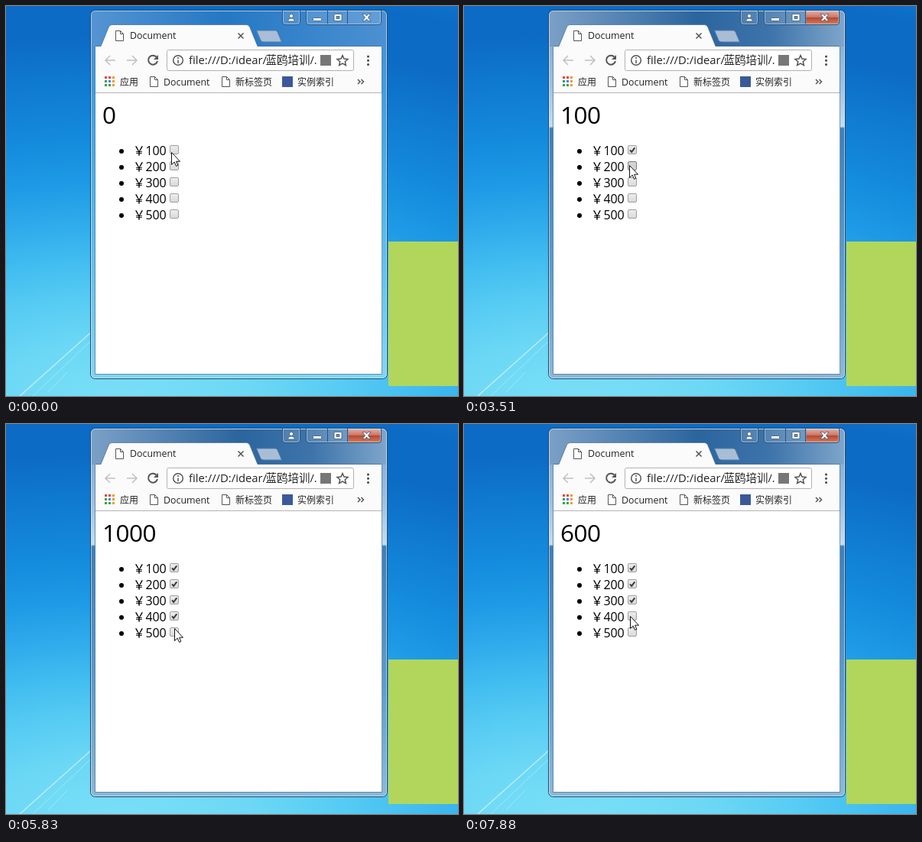
Recreate the animation shown at these times as an HTML page. Size 591x510 px, loop 8 s.

```html
<!DOCTYPE html>
<html lang="zh">
<head>
<meta charset="utf-8">
<title>Document</title>
<style>
html, body { margin: 0; width: 100%; height: 100%; overflow: hidden; background: #1b95e2; }
svg { display: block; width: 100vw; height: 100vh; }
text { font: 12.4px "Open Sans", "Noto Sans CJK SC", "Noto Sans CJK", sans-serif; fill: #222; }
.cjk { font-family: "Noto Sans CJK SC", "Noto Sans CJK", sans-serif; font-size: 12px; }
.page { font-size: 16px; fill: #000; letter-spacing: -.1px; }
.line { fill: none; stroke: #555; stroke-width: 1.5; }
#total { font-size: 31.5px; letter-spacing: -.5px; }
</style>
</head>
<body>
<svg viewBox="0 0 591 510">
  <defs>
    <radialGradient id="sky" gradientUnits="userSpaceOnUse" cx="0" cy="0" r="600" gradientTransform="translate(150 530) scale(2 1)">
      <stop offset="0" stop-color="#7de0f7"/>
      <stop offset=".15" stop-color="#6cd8f5"/>
      <stop offset=".25" stop-color="#56cbf3"/>
      <stop offset=".33" stop-color="#42bdf0"/>
      <stop offset=".42" stop-color="#2ea9eb"/>
      <stop offset=".5" stop-color="#1d9ae5"/>
      <stop offset=".6" stop-color="#148adc"/>
      <stop offset=".7" stop-color="#107cd2"/>
      <stop offset=".82" stop-color="#0c6bc5"/>
      <stop offset=".92" stop-color="#0c6bc5"/>
      <stop offset="1" stop-color="#127ad0"/>
    </radialGradient>
    <linearGradient id="idleSide" x2="0" y2="1">
      <stop offset="0" stop-color="#4a8ccc"/>
      <stop offset=".2" stop-color="#3f9be0"/>
      <stop offset=".5" stop-color="#4cb4ea"/>
      <stop offset="1" stop-color="#7fd6f3"/>
    </linearGradient>
    <linearGradient id="idleTop">
      <stop offset="0" stop-color="#5594d3"/>
      <stop offset=".45" stop-color="#2478c4"/>
      <stop offset="1" stop-color="#4c90d2"/>
    </linearGradient>
    <linearGradient id="activeSide" x2="0" y2="1">
      <stop offset="0" stop-color="#7aa3cc"/>
      <stop offset=".2" stop-color="#9cc0e0"/>
      <stop offset=".315" stop-color="#c3dcf0"/>
      <stop offset=".32" stop-color="#3d7fb8"/>
      <stop offset=".7" stop-color="#5d9cc9"/>
      <stop offset="1" stop-color="#8db8d6"/>
    </linearGradient>
    <linearGradient id="activeTop">
      <stop offset="0" stop-color="#7ba0c6"/>
      <stop offset=".5" stop-color="#2b659e"/>
      <stop offset=".75" stop-color="#3d74aa"/>
      <stop offset="1" stop-color="#7ea5ca"/>
    </linearGradient>
    <linearGradient id="red" x2="0" y2="1">
      <stop offset="0" stop-color="#dba092"/>
      <stop offset=".45" stop-color="#c4604c"/>
      <stop offset=".5" stop-color="#a92f18"/>
      <stop offset="1" stop-color="#cc6a45"/>
    </linearGradient>
    <linearGradient id="box" x2="0" y2="1">
      <stop offset="0" stop-color="#ededed"/>
      <stop offset="1" stop-color="#d9d9d9"/>
    </linearGradient>
    <g id="doc" fill="#fff" stroke="#555">
      <path d="M.5 .5H6.5L10.5 4.5V13.5H.5Z"/>
      <path d="M6.5 .5V4.5H10.5" fill="none"/>
    </g>
    <path id="arrow" class="line" d="M14 0H1M7-6L1 0L7 6"/>
  </defs>

  <!-- desktop -->
  <rect width="591" height="510" fill="url(#sky)"/>
  <g stroke="#d5f3fc" fill="none" opacity=".75">
    <path d="M18 510L112 426" stroke-width="1.5"/>
    <path d="M35 510L112 437M55 505L80 479" opacity=".6"/>
  </g>
  <rect x="500" y="308" width="189" height="189" fill="#b2d65c"/>

  <!-- window frame -->
  <g id="idle">
    <rect x="111" y="6" width="387" height="481" rx="6" fill="url(#idleSide)"/>
    <path d="M112 53V12Q112 7 117 7H492Q497 7 497 12V53Z" fill="url(#idleTop)"/>
  </g>
  <g id="active">
    <rect x="111" y="6" width="387" height="481" rx="6" fill="url(#activeSide)"/>
    <path d="M112 53V12Q112 7 117 7H492Q497 7 497 12V53Z" fill="url(#activeTop)"/>
    <path d="M447.5 7H491V21Q491 24 488 24H447.5Z" fill="url(#red)"/>
  </g>
  <rect x="110.5" y="5.5" width="388" height="482" rx="6" fill="none" stroke="#21496f"/>
  <rect x="111.5" y="6.5" width="386" height="480" rx="5" fill="none" stroke="#d4eaf8" opacity=".7"/>
  <g fill="#fff" fill-opacity=".13" stroke="#2b5380">
    <path d="M361.5 6V21Q361.5 24.5 365 24.5H381Q384.5 24.5 384.5 21V6"/>
    <path d="M392.5 6V21Q392.5 24.5 396 24.5H487Q490.5 24.5 490.5 21V6M420.5 6V24M446.5 6V24"/>
  </g>
  <path d="M362.5 7V21Q363 23.5 365 23.5H381Q383.5 23.5 383.5 21V7M393.5 7V21Q394 23.5 396 23.5H487Q489.5 23.5 489.5 21V7" fill="none" stroke="#fff" opacity=".4"/>
  <g fill="#fff" stroke="#3c5674" stroke-width=".8">
    <circle cx="373" cy="13" r="2.5"/>
    <path d="M368.5 20Q369 16 373 16T377.5 20Z"/>
    <rect x="401.5" y="15.5" width="11" height="4" rx="1"/>
    <path fill-rule="evenodd" d="M429 10.5H439V19.5H429ZM432 13.5V16.5H436V13.5Z"/>
    <path d="M466 10.5H469.5L471.5 13L473.5 10.5H477L473.5 15L477 19.5H473.5L471.5 17L469.5 19.5H466L469.5 15Z"/>
  </g>

  <!-- tab strip -->
  <path d="M327.5 32H352Q354 32 355 34L360.5 47H337Q334 47 333 45Z" fill="#a9bed6" stroke="#557da8"/>
  <path d="M117 53H124L134.5 27Q136 24.5 138.5 24.5H314.5Q317 24.5 318.5 27L329 53H491V114H117Z" fill="#fbfbfb"/>
  <path d="M117 52.5H124L134.5 27Q136 24.5 138.5 24.5H314.5Q317 24.5 318.5 27L329 52.5H491" fill="none" stroke="#4f7399" stroke-width=".8"/>
  <use href="#doc" x="143" y="32"/>
  <text x="162" y="43">Document</text>
  <path class="line" d="M303.5 35.5L310.5 42.5M310.5 35.5L303.5 42.5"/>

  <!-- toolbar -->
  <g opacity=".35">
    <use href="#arrow" x="129" y="71"/>
    <use href="#arrow" transform="translate(172 71) scale(-1 1)"/>
  </g>
  <path class="line" d="M196.5 66.5A6 6 0 1 0 198 72" style="stroke-width:2"/>
  <path d="M199 64V70H193Z" fill="#555"/>
  <rect x="210.5" y="57.5" width="244" height="27" rx="2" fill="#fff" stroke="#b2b2b2"/>
  <circle cx="225" cy="71" r="6.3" class="line"/>
  <path d="M225 67V69M225 70.5V75" class="line"/>
  <text x="239" y="76" style="font-size:14.8px">file:///D:/idear/</text>
  <text x="339.5" y="76" class="cjk" style="font-size:14.5px">蓝鸥培训</text>
  <text x="397.5" y="76" style="font-size:14.5px">/.</text>
  <rect x="411" y="64" width="14" height="14" fill="#777"/>
  <path class="line" d="M440 64.5L442 69L447 69.5L443.3 72.8L444.4 77.5L440 75L435.6 77.5L436.7 72.8L433 69.5L438 69Z"/>
  <g fill="#444">
    <circle cx="473.5" cy="66" r="1.5"/>
    <circle cx="473.5" cy="71.3" r="1.5"/>
    <circle cx="473.5" cy="76.5" r="1.5"/>
  </g>

  <!-- bookmarks -->
  <g id="apps"></g>
  <text x="149" y="104" class="cjk">应用</text>
  <use href="#doc" x="188" y="92"/>
  <text x="206" y="104">Document</text>
  <use href="#doc" x="282" y="92"/>
  <text x="300" y="104" class="cjk">新标签页</text>
  <rect x="361" y="92" width="14" height="14" fill="#3b5998"/>
  <text x="381" y="104" class="cjk">实例索引</text>
  <path class="line" d="M460 96L463 99L460 102M464.5 96L467.5 99L464.5 102"/>

  <!-- page -->
  <rect x="117" y="114" width="375" height="367" fill="#fff"/>
  <path d="M117 113.5H492" stroke="#b4b4b4"/>
  <path d="M116.5 53V481.5H491.5V53" fill="none" stroke="#567f9f" stroke-width=".8"/>
  <text id="total" class="page" x="126" y="153.5">0</text>
  <g id="list"></g>
  <path id="cursor" d="M.5 .5V16.5L4.2 13L6.5 18.4L8.8 17.4L6.6 12.2H11.5Z" fill="#fff" stroke="#111" stroke-linejoin="round"/>
</svg>
<script>
const $ = id => document.getElementById(id);
const LOOP = 8000, ACTIVATE = 2560;

// cursor tip: time, x, y
const moves = [
  [0, 216, 191], [130, 217, 191], [290, 219, 190], [2800, 220, 192], [2930, 220, 196],
  [3080, 217, 201], [3230, 216, 208], [3790, 216, 217], [3940, 217, 221], [4070, 217, 223],
  [4470, 217, 226], [4860, 220, 239], [5010, 220, 241], [5170, 220, 244], [5320, 220, 245],
  [5710, 220, 260], [5830, 220, 267], [7330, 219, 258], [7480, 217, 251]
];
// row, press time, release time
const clicks = [
  [0, 2560, 2680], [1, 3510, 3640], [2, 4610, 4730], [3, 5470, 5590],
  [4, 6230, 6350], [4, 6930, 7050], [3, 7750, 7880]
];

const dots = ['#e8453c', '#e8453c', '#f29a2e', '#36a352', '#4285f4', '#f29a2e', '#36a352', '#36a352', '#e8a02e'];
$('apps').innerHTML = dots.map((color, i) =>
  `<rect x="${129 + i % 3 * 5}" y="${92 + (i / 3 | 0) * 5}" width="3" height="3" fill="${color}"/>`).join('');

$('list').innerHTML = [1, 2, 3, 4, 5].map(n => `
  <g transform="translate(0 ${n * 21 - 21})">
    <circle cx="151" cy="190" r="3"/>
    <text class="page cjk" x="166" y="195" style="font-size:16px">￥</text>
    <text class="page" x="182.5" y="195">${n}00</text>
    <rect class="box" x="214.5" y="182.5" width="11" height="11" rx="1.5" fill="url(#box)" stroke="#a0a0a0"/>
    <path class="tick" d="M217 188.300L219.200 190.800L223.300 185.300" fill="none" stroke="#3c3c3c" stroke-width="2"/>
  </g>`).join('');
const boxes = document.querySelectorAll('.box');
const ticks = document.querySelectorAll('.tick');

const show = (el, on) => el.setAttribute('visibility', on ? 'visible' : 'hidden');

function draw(t) {
  const [, x, y] = moves.findLast(m => m[0] <= t);
  $('cursor').setAttribute('transform', `translate(${x} ${y})`);
  show($('idle'), t < ACTIVATE);
  show($('active'), t >= ACTIVATE);

  let total = 0;
  ticks.forEach((tick, i) => {
    const own = clicks.filter(c => c[0] === i);
    const checked = own.filter(c => c[2] <= t).length % 2 === 1;
    const pressed = own.some(c => c[1] <= t && t < c[2]);
    show(tick, checked);
    boxes[i].setAttribute('fill', pressed ? '#d2d2d2' : 'url(#box)');
    boxes[i].setAttribute('stroke', pressed ? '#808080' : '#a0a0a0');
    if (checked) total += 100 * (i + 1);
  });
  $('total').textContent = total;
}

function frame() {
  draw(performance.now() % LOOP);
  requestAnimationFrame(frame);
}
frame();
</script>
</body>
</html>
```
